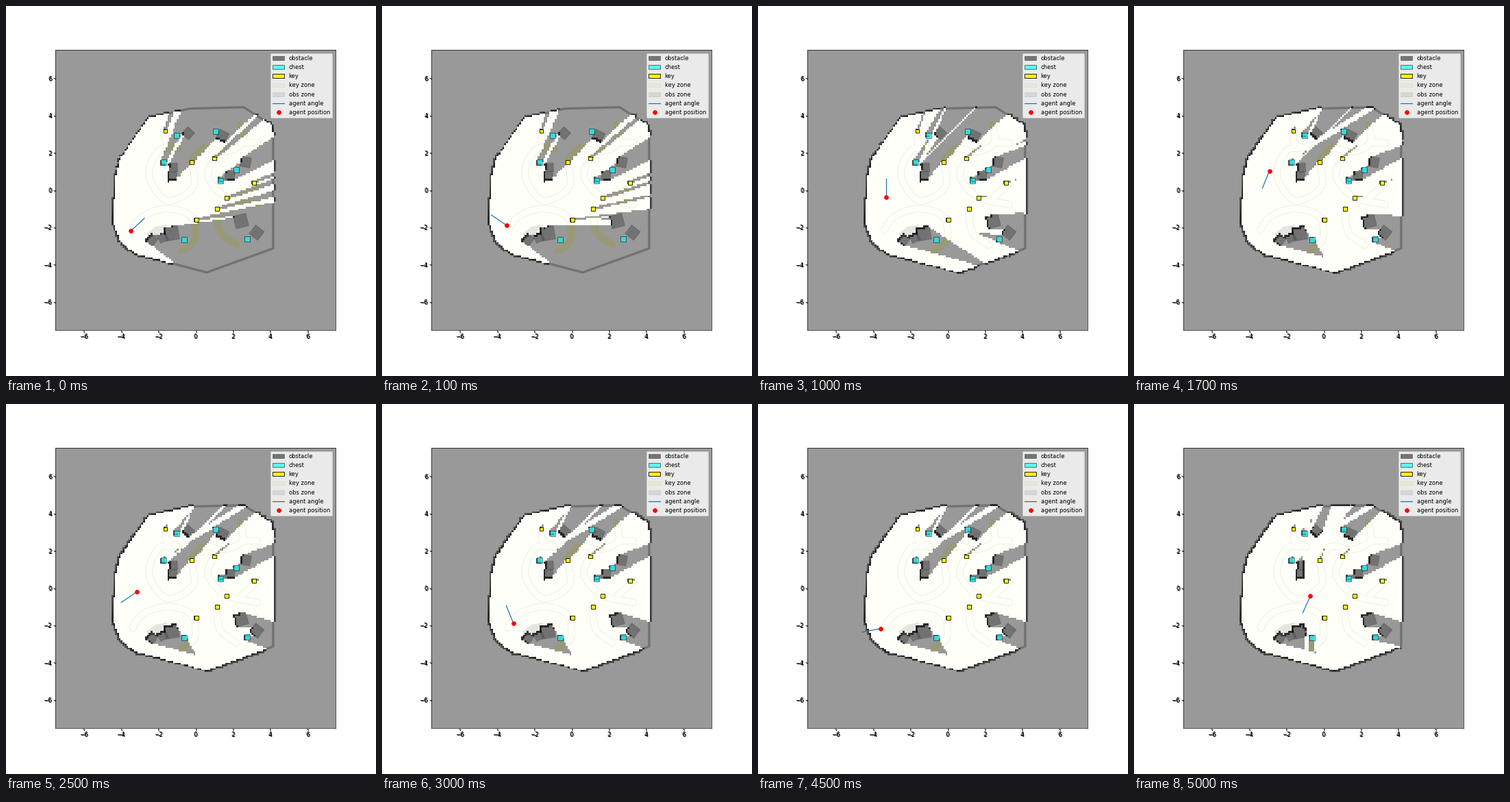
Animation of 540x540 px, one loop 5100 ms. Source, as a matplotlib script:

```python
import numpy as np
import matplotlib.pyplot as plt
from matplotlib.animation import FuncAnimation
from matplotlib.lines import Line2D
from matplotlib.patches import Patch, Polygon
from matplotlib.path import Path

SIZE, DPI = 540, 60
SCALE, CX, CY = 27.2, 276.7, 268.7
CELLS, HALF = 150, 7.5
CELL = 2 * HALF / CELLS
RAYS, REACH, STEP = 1000, 10, 0.04
FREE, HIT, UNKNOWN = (1, 1, 0.98, 1), (0, 0, 0, 0.7), (0.43, 0.43, 0.43, 0.7)
SOLID = dict(facecolor="black", edgecolor="black", alpha=0.5, lw=0.8)
CHEST = dict(facecolor="cyan", edgecolor="black", alpha=0.6, lw=1)
KEY = dict(facecolor="yellow", edgecolor="black", lw=1)


def world(points):
    """Stage pixels to room coordinates."""
    p = np.array(points, float)
    return np.column_stack([(p[:, 0] - CX) / SCALE, (CY - p[:, 1]) / SCALE])


def square(center, side, deg=0):
    a = np.radians(deg + 45 + 90 * np.arange(4))
    return center + side / np.sqrt(2) * np.column_stack([np.cos(a), np.sin(a)])


wall = world([(208, 164), (268, 150), (347, 148), (388, 174), (390, 188),
              (390, 354), (293, 389), (187, 361), (167, 342), (156, 316),
              (161, 248), (167, 223)])
# centre, side and turn of each block
blocks = [(266, 186, 14, 48), (316, 190, 15, -27), (350, 228, 15, -10),
          (327, 248, 14, -4), (244, 236, 13, 4), (243, 249, 14, 6),
          (343, 314, 19, 14), (366, 331, 16, -38), (242, 332, 20, 10),
          (229, 338, 13, 25), (213, 341, 14, -35)]
obstacles = [square(world([b[:2]])[0], b[2] / SCALE, b[3]) for b in blocks]
obs_zone = world([(205, 332), (219, 322), (236, 319), (213, 347)])
chests = [square(c, 0.3) for c in world(
    [(249, 189), (306, 183), (230, 228), (336, 239), (313, 255), (260, 341),
     (352, 340)])]
keys = [square(k, 0.2) for k in world(
    [(233, 183), (271, 228), (304, 223), (362, 258), (322, 280), (308, 296),
     (278, 312)])]
zones = [
    [(233, 186), (235, 200), (252, 209)],
    [(271, 228), (273, 265), (235, 284), (209, 248), (222, 212), (240, 208)],
    [(271, 228), (288, 208), (318, 213), (345, 200), (342, 174)],
    [(346, 200), (367, 200)],
    [(304, 223), (295, 250), (322, 279), (367, 290)],
    [(345, 279), (367, 259)],
    [(308, 297), (313, 330), (337, 349)],
    [(185, 327), (200, 307), (235, 296), (270, 307), (276, 340), (257, 357)],
]
# arrival in ms, steps taken to get there, x, y, heading in degrees
stops = [
    (0, 1, -3.47, -2.20, 43), (100, 1, -3.47, -1.90, 146),
    (700, 1, -3.47, -1.60, 246), (800, 1, -3.50, -2.70, 30),
    (1000, 1, -3.30, -0.40, 90), (1100, 1, -1.70, -0.40, 40),
    (1700, 1, -2.90, 1.02, 248), (2700, 4, -3.40, -1.45, 180),
    (3000, 2, -3.12, -1.88, 112), (3300, 1, -3.86, -2.28, 0),
    (3900, 3, -2.98, -2.30, -10), (4500, 1, -3.60, -2.18, 191),
    (5000, 5, -0.70, -0.42, 246),
]


def walk():
    """One pose per 100 ms step, evenly spaced from stop to stop."""
    poses, last = [], np.array(stops[0][2:])
    for ms, n, *goal in stops:
        for k in range(1, n + 1):
            pose = last + (np.array(goal) - last) * k / n
            poses.append((ms - 100 * (n - k), *pose))
        last = np.array(goal)
    return poses


def spline(points, n=30):
    """Smooth curve through a few points."""
    p = np.vstack([points[:1], points, points[-1:]])
    t = np.linspace(0, 1, n)[:, None]
    return np.vstack([
        0.5 * (2 * b + (c - a) * t + (2 * a - 5 * b + 4 * c - d) * t**2
               + (3 * b - a - 3 * c + d) * t**3)
        for a, b, c, d in zip(p, p[1:], p[2:], p[3:])])


def solid_cells():
    axis = -HALF + (np.arange(CELLS) + 0.5) * CELL
    grid = np.stack(np.meshgrid(axis, axis), -1).reshape(-1, 2)
    solid = ~Path(wall).contains_points(grid)
    for shape in obstacles + chests + keys:
        solid |= Path(shape).contains_points(grid)
    return solid.reshape(CELLS, CELLS)


def scan(solid, x, y):
    """Cells seen free and cells hit by rays from one place."""
    a = np.linspace(0, 2 * np.pi, RAYS, endpoint=False)[:, None]
    r = np.arange(0, REACH, STEP)
    col = ((x + r * np.cos(a) + HALF) / CELL).astype(int).clip(0, CELLS - 1)
    row = ((y + r * np.sin(a) + HALF) / CELL).astype(int).clip(0, CELLS - 1)
    count = np.cumsum(solid[row, col], axis=1)
    free, hit = np.zeros_like(solid), np.zeros_like(solid)
    free[row[count == 0], col[count == 0]] = True
    first = (np.arange(RAYS), (count > 0).argmax(axis=1))
    hit[row[first], col[first]] = True
    return free, hit


def build_maps(poses):
    solid = solid_cells()
    img = np.full((CELLS, CELLS, 4), UNKNOWN)
    maps = []
    for _, x, y, _ in poses:
        free, hit = scan(solid, x, y)
        img[free] = FREE
        img[hit] = HIT
        maps.append(img.copy())
    return maps


def zone_field():
    """Distance from each point to the nearest zone centre line."""
    axis = np.linspace(-4.5, 4.5, 260)
    gx, gy = np.meshgrid(axis, axis)
    dist = np.full(gx.shape, 9.0)
    for z in zones:
        for px, py in spline(world(z)):
            dist = np.minimum(dist, np.hypot(gx - px, gy - py))
    return axis, axis, dist


poses = walk()
starts = [p[0] for p in poses]
maps = build_maps(poses)

fig = plt.figure(figsize=(SIZE / DPI, SIZE / DPI), dpi=DPI, facecolor="white")
rect = np.array([72.4, 67.4, 408.2, 408.2]) / SIZE
ax = fig.add_axes(rect)
# a second set of labels one pixel away gives the heavy figures
ghost = fig.add_axes(rect + np.array([1, -1, 0, 0]) / SIZE, facecolor="none")
ghost.spines[:].set_visible(False)
for a in (ax, ghost):
    a.set(xlim=(-HALF, HALF), ylim=(-HALF, HALF),
          xticks=range(-6, 7, 2), yticks=range(-6, 7, 2))

field = zone_field()
ax.contourf(*field, levels=[-1, 0.18], colors=["yellow"], alpha=0.4, zorder=1)
for shape in obstacles:
    ax.add_patch(Polygon(shape, zorder=1.5, **SOLID))
ax.add_patch(Polygon(wall, fill=False, edgecolor="black", alpha=0.5, lw=4,
                     zorder=1.5))
grid_img = ax.imshow(maps[0], extent=(-HALF, HALF, -HALF, HALF), origin="lower",
                     interpolation="nearest", aspect="auto", zorder=2)
ax.contour(*field, levels=[0.18], colors=[(0.62, 0.62, 0.4)], alpha=0.22,
           linewidths=0.9, zorder=2.5)
ax.add_patch(Polygon(obs_zone, color="gray", alpha=0.2, lw=0, zorder=2.5))
for shapes, style in ((chests, CHEST), (keys, KEY)):
    for shape in shapes:
        ax.add_patch(Polygon(shape, zorder=3, **style))
heading, = ax.plot([], [], color="tab:blue", lw=1.5, zorder=4)
agent, = ax.plot([], [], "o", color="red", ms=7, zorder=5)

ax.legend(handles=[
    Patch(label="obstacle", **SOLID),
    Patch(label="chest", **CHEST),
    Patch(label="key", **KEY),
    Patch(facecolor=(0.91, 0.91, 0.85), edgecolor=(0.87, 0.87, 0.79),
          label="key zone"),
    Patch(facecolor=(0.84, 0.84, 0.84), edgecolor=(0.8, 0.8, 0.8),
          label="obs zone"),
    Line2D([], [], color="tab:blue", lw=1.5, label="agent angle"),
    Line2D([], [], color="red", marker="o", ms=7, ls="", label="agent position"),
], loc="upper right", fontsize=10)


def update(frame):
    i = np.searchsorted(starts, frame * 100, side="right") - 1
    _, x, y, deg = poses[i]
    t = np.radians(deg)
    grid_img.set_data(maps[i])
    heading.set_data([x, x + np.cos(t)], [y, y + np.sin(t)])
    agent.set_data([x], [y])
    return grid_img, heading, agent


anim = FuncAnimation(fig, update, frames=51, interval=100, repeat=True,
                     repeat_delay=0, blit=False)
plt.show()
```
